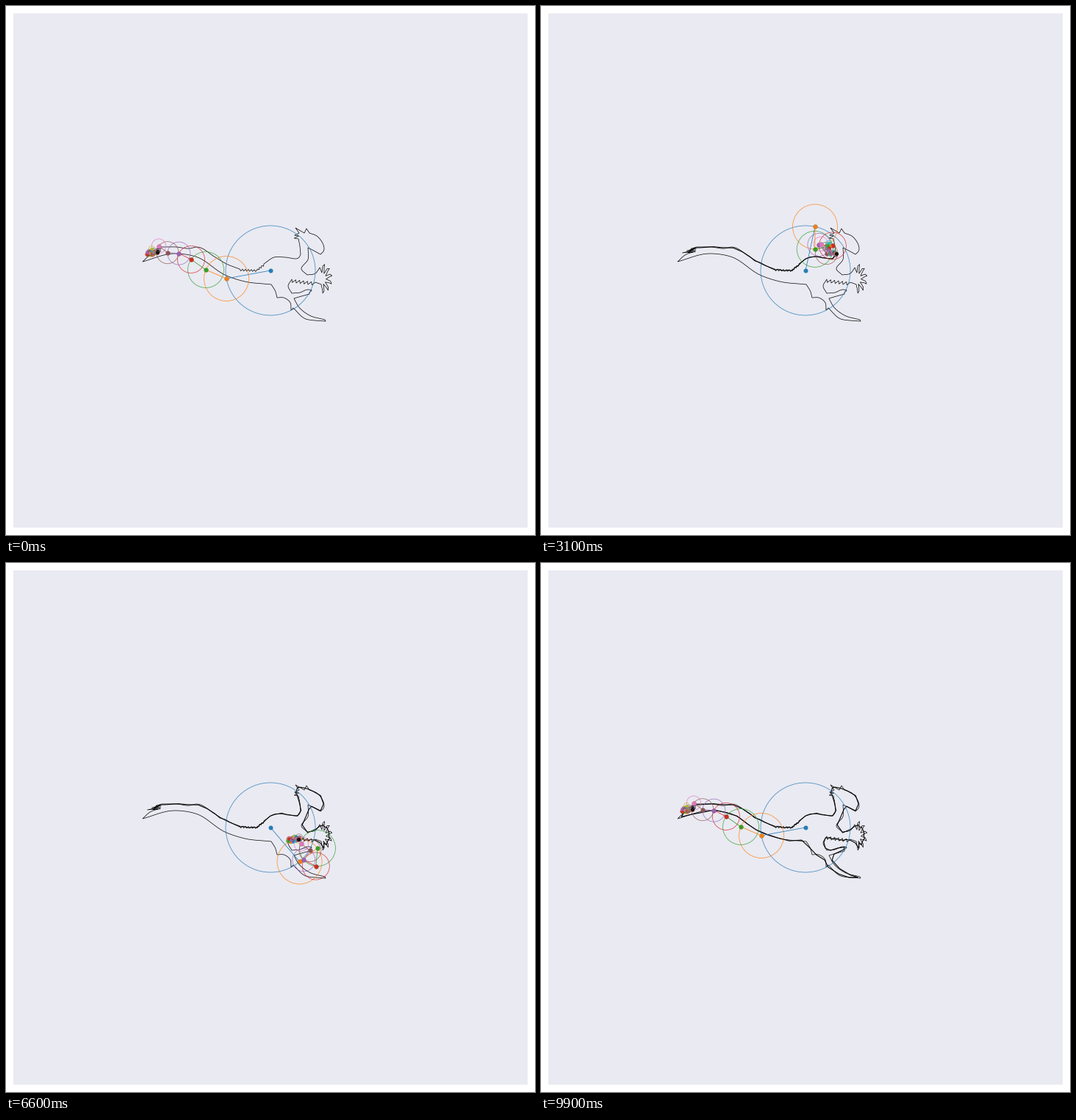
Animation, 720 px wide and 720 px high, one loop 10000 ms. Source, as a matplotlib script:

```python
import numpy as np
import matplotlib.pyplot as plt
from matplotlib.animation import FuncAnimation
from matplotlib.patches import Circle

FRAMES = 100
LAST = FRAMES - 1
SAMPLES = 1000
FINE_ARMS = 60

# Largest arms: radius, turns per loop, starting angle in degrees
MAIN = [(61, -1, 190.4), (30.5, 1, 156.8), (24.5, 2, 145),
        (18.5, -3, 153.4), (15.5, -2, 176.4), (15, 3, 143)]


def line(*points):
    x, y = np.array(points, float).T
    return x + 1j * y


def walked(z):
    return np.concatenate([[0], np.cumsum(abs(np.diff(z)))])


def curve(*points, steps=8):
    """Smooth cubic through the key points."""
    z = line(*points)
    s = walked(z)
    slope = np.gradient(z, s)
    pos = np.linspace(0, len(z) - 1, steps * (len(z) - 1) + 1)
    k = np.minimum(pos.astype(int), len(z) - 2)
    u, h = pos - k, s[k + 1] - s[k]
    return (z[k] * (1 + 2 * u) * (1 - u) ** 2 + z[k + 1] * u * u * (3 - 2 * u)
            + h * slope[k] * u * (1 - u) ** 2 - h * slope[k + 1] * u * u * (1 - u))


def teeth(start, end, count, spike, fade=1):
    """Row of spikes between two points, the last one scaled by fade."""
    base = np.linspace(complex(*start), complex(*end), 2 * count + 1)
    base[1::2] += complex(*spike) * np.linspace(1, fade, count)
    return base


def claws(center, rx, ry, first, last, count):
    """Fan of hooked fingers around a palm."""
    angles, gap = np.linspace(first, last, count, retstep=True)
    turn, reach = np.array([-0.5, -0.3, 0, 0.05, 0.5]), np.array([0.4, 0.85, 1, 0.75, 0.4])
    a = np.radians(angles[:, None] + gap * turn)
    return (complex(*center) + reach * (rx * np.cos(a) + 1j * ry * np.sin(a))).ravel()


# Outline in pixels: strokes of each part and the step at which it is done
PARTS = [
    (11, [teeth((210, 334), (212, 328), 3, (-18, 3), 0.4),
          curve((212, 328), (232, 328), (250, 330), (259, 328), (285, 342))]),
    (31, [curve((285, 342), (300, 351), (318, 358)),
          teeth((318, 358), (342, 359), 6, (-0.5, 2.5)),
          teeth((342, 358), (351, 351), 3, (1, 2)),
          curve((351, 351), (365, 342), (380, 342), (399, 342), (401, 338))]),
    (46, [curve((401, 338), (400, 327), (398, 317)),
          teeth((398, 317), (399, 309), 2, (-6, 1)),
          line((394, 302), (406, 309), (409, 303), (413, 309)),
          curve((413, 309), (423, 313), (432, 334), (428, 338)),
          curve((428, 338), (419, 333), (411, 329)),
          curve((411, 329), (411, 345), (402, 358), (410, 366))]),
    (60, [curve((410, 366), (421, 364), (427, 356)),
          claws((430, 371), 14, 20, -75, 85, 6)]),
    (74, [teeth((421, 376), (389, 372), 6, (-2, 4)),
          curve((389, 372), (384, 381), (389, 391)),
          curve((389, 391), (400, 390), (411, 386), (416, 387), (413, 390))]),
    (LAST, [curve((413, 392), (402, 395), (392, 398)),
            curve((392, 398), (398, 409), (413, 421), (434, 427)),
            curve((435, 429), (420, 428), (408, 426), (391, 411)),
            curve((388, 414), (387, 404), (378, 397), (369, 397)),
            curve((369, 397), (367, 389), (361, 379)),
            curve((361, 379), (325, 375), (300, 367), (258, 341), (228, 337), (186, 348)),
            curve((186, 348), (196, 339), (210, 334))]),
]


def timed_outline():
    """Outline around the stage centre, with the time each point is reached."""
    times, points, start = [], [], 0
    for stop, strokes in PARTS:
        z = np.concatenate(strokes)
        if points:
            z = np.concatenate([points[-1][-1:], z])
        s = walked(z)
        times.append((start + (stop - start) * s / s[-1]) / LAST)
        points.append(z)
        start = stop
    return np.concatenate(times), np.conj(np.concatenate(points) - (360 + 360j))


def arm_vectors(coef, freq, t):
    return coef * np.exp(2j * np.pi * freq * t)


def build_arms(times, points):
    """Main arms first, then the strongest terms of what they leave over."""
    radius, freq, phase = np.array(MAIN, float).T
    coef = radius * np.exp(1j * np.radians(phase))
    t = np.arange(SAMPLES) / SAMPLES
    path = np.interp(t, times, points)
    rest = path - arm_vectors(coef, freq, t[:, None]).sum(axis=1)
    fine = np.fft.fft(rest) / SAMPLES
    fine_freq = np.fft.fftfreq(SAMPLES, 1 / SAMPLES)
    top = np.argsort(-abs(fine))[:FINE_ARMS]
    return np.concatenate([coef, fine[top]]), np.concatenate([freq, fine_freq[top]])


times, outline = timed_outline()
coef, freq = build_arms(times, outline)
turn = np.arange(FRAMES)[:, None] / LAST
joints = np.cumsum(arm_vectors(coef, freq, turn), axis=1)
joints = np.hstack([np.zeros((FRAMES, 1)), joints])
tips = joints[:, -1]

fig = plt.figure(figsize=(10, 10), dpi=72, facecolor="white")
ax = fig.add_axes([10 / 720, 10 / 720, 700 / 720, 700 / 720])
ax.set(xlim=(-350, 350), ylim=(-350, 350), xticks=[], yticks=[], facecolor="#eaeaf2")
for spine in ax.spines.values():
    spine.set_visible(False)

ax.plot(outline.real, outline.imag, color="black", lw=0.7, zorder=1)
trace, = ax.plot([], [], color="black", lw=1.1, zorder=2)

circles, arms = [], []
for i, radius in enumerate(abs(coef)):
    color = f"C{i % 10}"
    circle = Circle((0, 0), radius, fill=False, ec=color, lw=0.8, alpha=0.8, zorder=3)
    circles.append(ax.add_patch(circle))
    size = 5 if radius > 6 else 3.5
    arms += ax.plot([], [], "o-", color=color, lw=0.8, ms=size, alpha=0.95, zorder=4)
pen, = ax.plot([], [], "o", color="black", ms=4, alpha=0.8, zorder=5)


def update(n):
    for i, (circle, arm) in enumerate(zip(circles, arms)):
        ends = joints[n, i:i + 2]
        circle.center = ends[0].real, ends[0].imag
        arm.set_data(ends.real, ends.imag)
    trace.set_data(tips[:n + 1].real, tips[:n + 1].imag)
    pen.set_data([tips[n].real], [tips[n].imag])
    return [trace, *circles, *arms, pen]


anim = FuncAnimation(fig, update, frames=FRAMES, interval=100, repeat=True,
                     repeat_delay=0, blit=False)
plt.show()
```
